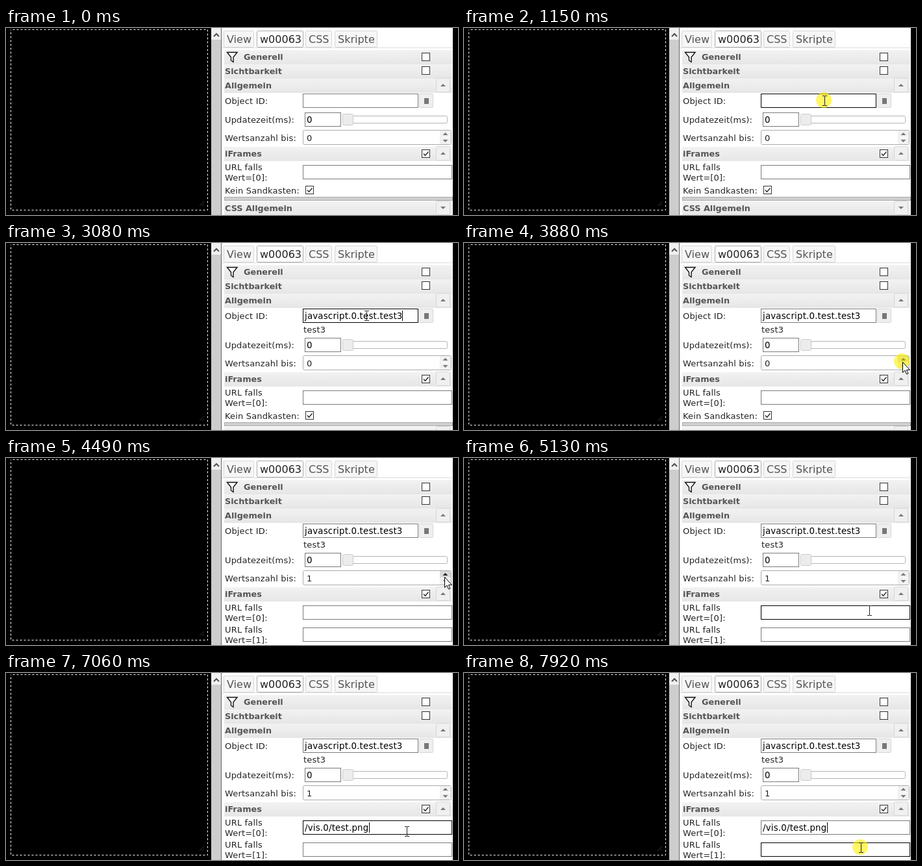
Animation of 696x288 px, one loop 7.99 s. Source, as an HTML page:

```html
<!DOCTYPE html>
<html lang="de">
<head>
<meta charset="utf-8">
<style>
html, body { margin: 0; width: 100%; height: 100%; overflow: hidden; background: #000; }
svg { display: block; width: 696px; height: 288px; }
text { font-family: "DejaVu Sans", Verdana, sans-serif; white-space: pre; }
.label { font-size: 13px; letter-spacing: .17px; fill: #222; }
.value { font-size: 13.33px; letter-spacing: .2px; fill: #000; }
.head { font-size: 12.8px; font-weight: bold; fill: #555; }
.tab { font-size: 16px; fill: #555; }
.active { fill: #222; }
</style>
</head>
<body>
<svg id="stage" viewBox="0 0 696 288"></svg>
<script>
const LOOP = 7990, BLINK = 533, GREY = '#d6d6d6';
const stage = document.getElementById('stage');

// The pointer glides to each stop, rests there and clicks
const entry = { x: 575, y: 254 };
const stops = [
  { from: 300, to: 1080, click: 1150, x: 555, y: 112 },
  { from: 3170, to: 3650, click: 3880, x: 675, y: 183 },
  { from: 4490, to: 5290, click: 5670, x: 618, y: 241 },
  { from: 6910, to: 7690, click: 7840, x: 611, y: 269 }
];

const clamp = v => Math.min(1, Math.max(0, v));
const smooth = p => p * p * (3 - 2 * p);
const text = (cls, x, y, s) => `<text class="${cls}" x="${x}" y="${y}">${s}</text>`;
const fill = (x, y, w, h, c) => `<rect x="${x}" y="${y}" width="${w}" height="${h}" fill="${c}"/>`;
const box = (x, y, w, h, c, edge, r = 0) =>
  `<rect x="${x + .5}" y="${y + .5}" width="${w - 1}" height="${h - 1}" rx="${r}" fill="${c}" stroke="${edge}"/>`;
const line = (d, c, w = 1) => `<path d="${d}" fill="none" stroke="${c}" stroke-width="${w}"/>`;
const shape = (d, c, edge, w = 1) => `<path d="${d}" fill="${c}" stroke="${edge}" stroke-width="${w}"/>`;
const arrow = (x, y, dir, c = '#777') => `<path d="M${x - 4} ${y + 2 * dir}h8l-4 ${-4 * dir}z" fill="${c}"/>`;
const moved = (dy, s) => `<g transform="translate(0 ${dy})">${s}</g>`;

function pointerAt(t) {
  if (t < stops[0].from) return null;
  let { x, y } = entry;
  for (const s of stops) {
    const p = smooth(clamp((t - s.from) / (s.to - s.from)));
    x += (s.x - x) * p;
    y += (s.y - y) * p;
  }
  return { x: Math.round(x), y: Math.round(y) };
}

function caret(t, start, end, x, y) {
  const lit = t >= start && t < end && (t - start) % (2 * BLINK) < BLINK;
  return lit ? fill(x, y, 1, 16, '#000') : '';
}

function check(x, y, on) {
  return box(x, y, 13, 13, '#fff', '#333') +
    (on ? line(`M${x + 3} ${y + 6.5}l2.5 3 5-6`, '#222', 1.3) : '');
}

function header(y, label, dir, x = 337) {
  return fill(336, y, 351, 22, 'url(#bar)') + text('head', x, y + 15, label) +
    (dir ? box(662, y - 1, 22, 22, '#f0f0f0', GREY, 1) + arrow(673, y + 10, dir) : '');
}

function tab(x, w, label, active) {
  return box(x, 4, w, 26, active ? '#fff' : '#f6f6f6', active ? '#aaa' : GREY, 1) +
    text(active ? 'tab active' : 'tab', x + 5, 23, label);
}

function spinButton(y, dir, hot) {
  return fill(668, y, 17, 10, hot ? '#dadada' : '#f1f1f1') + arrow(676.5, y + 5, dir, hot ? '#222' : '#777');
}

const bar = `<defs><linearGradient id="bar" x2="0" y2="1">
  <stop stop-color="#f2f2f2"/><stop offset="1" stop-color="#e6e6e6"/></linearGradient></defs>`;

const canvasPane =
  `<rect x="7.5" y="2.5" width="303" height="278" fill="none" stroke="#fff" stroke-dasharray="3" stroke-dashoffset="3"/>` +
  line('M298 274l7-7M302 274l3-3', '#333') +
  fill(316, 0, 15, 288, '#f0f0f0') + fill(316, 18, 15, 270, '#cdcdcd') +
  line('M320 13l4-4 4 4', '#505050', 2);

const panelTop = fill(332, 0, 356, 288, '#fff') + fill(331, 0, 1, 288, '#666') + fill(332, 30, 355, 1, '#ddd') +
  tab(335, 47, 'View') + tab(386, 72, 'w00063', true) + tab(461, 41, 'CSS') + tab(506, 66, 'Skripte') +
  header(34, 'Generell', 0, 366) + header(56, 'Sichtbarkeit', 0) + header(78, 'Allgemein', 1) +
  check(640, 38) + check(640, 59) +
  shape('M340.5 37.5h15.5l-6 7.5v7.5l-3.5-2.5v-5z', '#fff', '#111', 1.4) +
  text('label', 337, 117, 'Object ID:') +
  box(636, 101, 22, 22, '#efefef', GREY, 1) + fill(644, 108, 7, 9, '#777');

function render(t) {
  const mouse = pointerAt(t);
  const labelled = t >= 3080, second = t >= 4490;
  const shift = labelled ? 16 : 0;
  let overField = false;

  function field(x, y, w, value) {
    const hover = mouse && mouse.x >= x && mouse.x < x + w && mouse.y >= y && mouse.y < y + 22;
    overField ||= hover;
    return box(x, y, w, 22, '#fff', hover ? '#000' : '#7a7a7a') + text('value', x + 3, y + 16, value);
  }

  function urlRow(n, value) {
    const y = 211 + shift + 34 * n;
    return text('label', 337, y + 8, 'URL falls') + text('label', 337, y + 24, `Wert=[${n}]:`) +
      field(457, y, 230, value);
  }

  const hot = t >= stops[1].to && t < stops[2].from + 150;
  const settings =
    text('label', 337, 146, 'Updatezeit(ms):') + field(460, 130 + shift, 56, '0').replace(/y="(\d+\.?\d*)"/g, (_, y) => `y="${y - shift}"`) +
    box(526, 135, 154, 12, '#fff', '#b5b5b5', 2) + box(518, 132, 17, 18, '#ececec', '#ccc', 2) +
    text('label', 337, 174, 'Wertsanzahl bis:') + box(457, 157, 229, 23, '#fff', '#aaa', 2) +
    text('label', 463, 174, t >= 4030 ? 1 : 0) +
    fill(668, 158, 1, 21, GREY) + spinButton(158, 1, hot) + spinButton(169, -1) +
    header(183, 'iFrames', 1) + check(640, 187, true);

  const footer = text('label', 337, 255, 'Kein Sandkasten:') + check(461, 243, true) +
    box(336, 260, 352, 6, '#d0d0d0', '#aaa') + header(267, 'CSS Allgemein', -1);

  const pasted = t >= 2240;
  let out = bar + canvasPane + panelTop +
    field(457, 101, 178, pasted ? 'javascript.0.test.test3' : '') +
    caret(t, 1784, 3570, pasted ? 610 : 460, 104) +
    (labelled ? text('label', 458, 138, 'test3') : '') +
    moved(shift, settings);

  const urlPasted = t >= 6590;
  out += urlRow(0, urlPasted ? '/vis.0/test.png' : '') + caret(t, 5750, LOOP, urlPasted ? 559 : 460, 230);
  if (second) out += urlRow(1, '');
  out += moved(shift + (second ? 34 : 0), footer);

  if (mouse) {
    const { x, y } = mouse;
    if (stops.some(s => t >= s.click && t < s.click + 150))
      out += `<circle cx="${x - 1}" cy="${y - 1}" r="12" fill="#fff000" opacity=".6"/>`;
    out += overField
      ? line(`M${x - 3} ${y - 7.5}h3l.5 1 .5-1h3M${x + .5} ${y - 7}v14M${x - 3} ${y + 7.5}h3l.5-1 .5 1h3`, '#222')
      : shape(`M${x + .5} ${y + .5}v16l3.5-3.5 2.5 6 2.5-1-2.5-5.5h5z`, '#fff', '#000');
  }
  stage.innerHTML = out;
}

const start = performance.now();
function frame() {
  render((performance.now() - start) % LOOP);
  requestAnimationFrame(frame);
}
frame();
</script>
</body>
</html>
```
